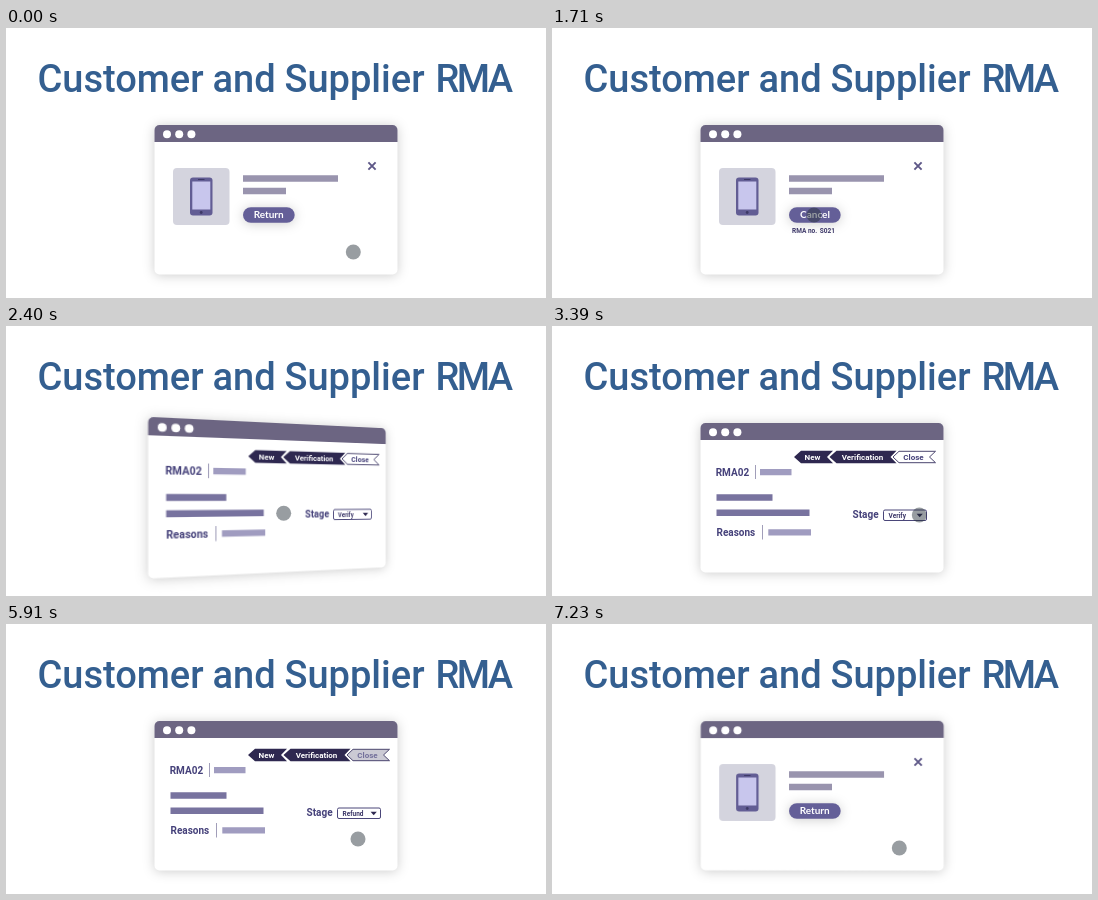
Animation, 540 px wide and 270 px high, one loop 7.26 s. Source, as an HTML page:

```html
<!DOCTYPE html>
<html lang="en">
<head>
<meta charset="utf-8">
<title>Customer and Supplier RMA</title>
<style>
  html, body { margin: 0; width: 100%; height: 100%; overflow: hidden; background: #fff; }
  svg { position: absolute; left: 0; top: 0; transform-origin: 270px 172px; }
  text { font-family: Roboto, Arial, sans-serif; font-weight: 700; }
  .title { font-size: 38px; font-weight: 500; fill: #345f90; }
  .tight { letter-spacing: -2.5px; }
  .label { font-size: 10px; fill: #45417a; }
  .small { font-size: 6.5px; fill: #3c3768; }
  .item { font-size: 7px; fill: #45417a; }
  .step { font-size: 8px; fill: #fff; }
  .button { font: 700 10px Lato, sans-serif; fill: #fff; }
  .mid { text-anchor: middle; }
  .shadow { filter: drop-shadow(0 1px 6px rgba(0,0,0,.2)); }
</style>
</head>
<body>
<svg width="540" height="270">
  <defs>
    <g id="window">
      <rect class="shadow" x="148.5" y="97" width="243" height="149.5" rx="5" fill="#fff"/>
      <path d="M148.5 114V102a5 5 0 0 1 5-5h233a5 5 0 0 1 5 5v12z" fill="#6c6582"/>
      <g fill="#fff">
        <circle cx="161" cy="106.2" r="4"/><circle cx="173.2" cy="106.2" r="4"/><circle cx="185.4" cy="106.2" r="4"/>
      </g>
    </g>
  </defs>
  <text class="title" y="63.6"><tspan x="31.5">Customer</tspan> <tspan x="206.5">and</tspan> <tspan x="278.5">Supplier</tspan> <tspan class="tight" x="429.5">RMA</tspan></text>
</svg>

<svg id="order" width="540" height="270">
  <use href="#window"/>
  <rect x="167" y="140" width="56.5" height="57" rx="4" fill="#d4d4de"/>
  <rect x="184" y="149.5" width="22.5" height="38" rx="3" fill="#625d94"/>
  <rect x="186.3" y="153.5" width="18" height="28" fill="#c8c6ed"/>
  <path d="M192 151.5h6.5" stroke="#3d3966"/>
  <circle cx="195.2" cy="184.5" r="1.4" fill="#3d3966"/>
  <path d="M237 147.3h95v6.4h-95zM237 159.8h43v6.4h-43z" fill="#9994ae"/>
  <path d="M362.4 134.4l7.2 7.2m0-7.2l-7.2 7.2" stroke="#5d5787" stroke-width="1.9"/>
  <rect class="shadow" x="237" y="179.2" width="51.7" height="15.6" rx="7.8" fill="#645f98"/>
  <text id="return" class="button mid" x="262.7" y="190.3">Return</text>
  <text id="cancel" class="button mid" x="263" y="190.3">Cancel</text>
  <g id="number">
    <text class="small" x="240" y="205">RMA no.</text>
    <text class="small" x="267.7" y="205">S021</text>
  </g>
</svg>

<svg id="rma" width="540" height="270">
  <use href="#window"/>
  <path d="M242 131l7-6.2h32l-6 6.2 6 6.2h-32z" fill="#2e2850"/>
  <path d="M277.5 131l7-6.2h60l-6 6.2 6 6.2h-60z" fill="#2e2850"/>
  <path id="close" d="M341 131l6-5.7h36.5l-6 5.7 6 5.7h-36.5z" fill="#2e2850" stroke="#4b466f"/>
  <text class="step mid" x="260.5" y="134">New</text>
  <text class="step mid" x="310.5" y="134">Verification</text>
  <text id="closeText" class="step mid" x="361.5" y="134">Close</text>
  <text class="label" x="163.7" y="149.8">RMA02</text>
  <text class="label" x="164.5" y="209.6">Reasons</text>
  <text class="label" x="300.6" y="192.4">Stage</text>
  <path d="M203.5 139v14M210.5 199v14.5" stroke="#a19eb9"/>
  <path d="M208 143h31.5v6.3h-31.5zM216.3 203.3h42.7v6.3h-42.7z" fill="#a09cc0"/>
  <path d="M164.5 168.3h56v6.4h-56zM164.5 183.5h93v6.4h-93z" fill="#78739f"/>
  <rect x="331.5" y="184" width="43" height="10.5" rx="1.5" fill="#fff" stroke="#4a4679"/>
  <path d="M364.6 187.7h6.2l-3.1 3.6z" fill="#2e2850"/>
  <text id="verify" class="small" x="336.6" y="191.7">Verify</text>
  <text id="refund" class="small" x="336.6" y="191.7">Refund</text>
  <g id="menu">
    <rect x="335.5" y="196" width="30.5" height="22" fill="#fff" style="filter:drop-shadow(0 1px 2px rgba(0,0,0,.15))"/>
    <text class="item mid" x="350.5" y="204.2">Verify</text>
    <text class="item mid" x="350.3" y="213.6">Refund</text>
  </g>
</svg>

<svg width="540" height="270">
  <circle id="cursor" r="7.5" fill="rgba(36,46,56,.47)"/>
</svg>

<script>
const LOOP = 7260;
const $ = id => document.getElementById(id);
const ramp = (t, from, to) => Math.min(1, Math.max(0, (t - from) / (to - from)));
const easeInOut = (p, n) => p < .5 ? (2 * p) ** n / 2 : 1 - (2 - 2 * p) ** n / 2;
const mix = (a, b, p) => a + (b - a) * p;
const fade = (id, value) => $(id).style.opacity = value;

// Pointer moves: start, end, target x, target y
const moves = [
  [0, 480, 262, 187],
  [2270, 2750, 367.3, 189],
  [4540, 4890, 352, 215],
  [6750, 7200, 347.3, 224]
];
const clicks = [780, 3780, 5190];

function turn(id, angle) {
  const shown = Math.abs(angle) < 90;
  $(id).style.visibility = shown ? 'visible' : 'hidden';
  $(id).style.transform = angle && shown ? `perspective(374px) rotateY(${angle}deg)` : 'none';
}

function draw(t) {
  const flip = 180 * (easeInOut(ramp(t, 1990, 2550), 3) - easeInOut(ramp(t, 6715, 7275), 3));
  turn('order', -flip);
  turn('rma', 180 - flip);

  // The order page is reset while it is hidden
  const returned = t > 4000 ? 0 : ramp(t, 900, 1300);
  fade('return', 1 - returned);
  fade('cancel', returned);
  fade('number', t > 4000 ? 0 : ramp(t, 1050, 1500));

  const chosen = ramp(t, 5330, 5600);
  fade('verify', 1 - chosen);
  fade('refund', chosen);
  fade('menu', ramp(t, 3870, 4260) * (1 - chosen));

  const closed = ramp(t, 5830, 6160);
  $('close').style.fillOpacity = closed;
  $('closeText').style.fill =
    `rgb(${[69, 65, 122].map(c => Math.round(mix(c, 255, closed)))})`;

  let x = 347.3, y = 224;
  for (const [from, to, toX, toY] of moves) {
    const p = easeInOut(ramp(t, from, to), 2);
    x = mix(x, toX, p);
    y = mix(y, toY, p);
  }
  const press = clicks.reduce((sum, at) => sum + Math.sin(Math.PI * ramp(t, at, at + 300)), 0);
  $('cursor').setAttribute('transform', `translate(${x} ${y}) scale(${1 - .2 * press})`);
}

const start = performance.now();
function tick() {
  draw((performance.now() - start) % LOOP);
  requestAnimationFrame(tick);
}
tick();
</script>
</body>
</html>
```
